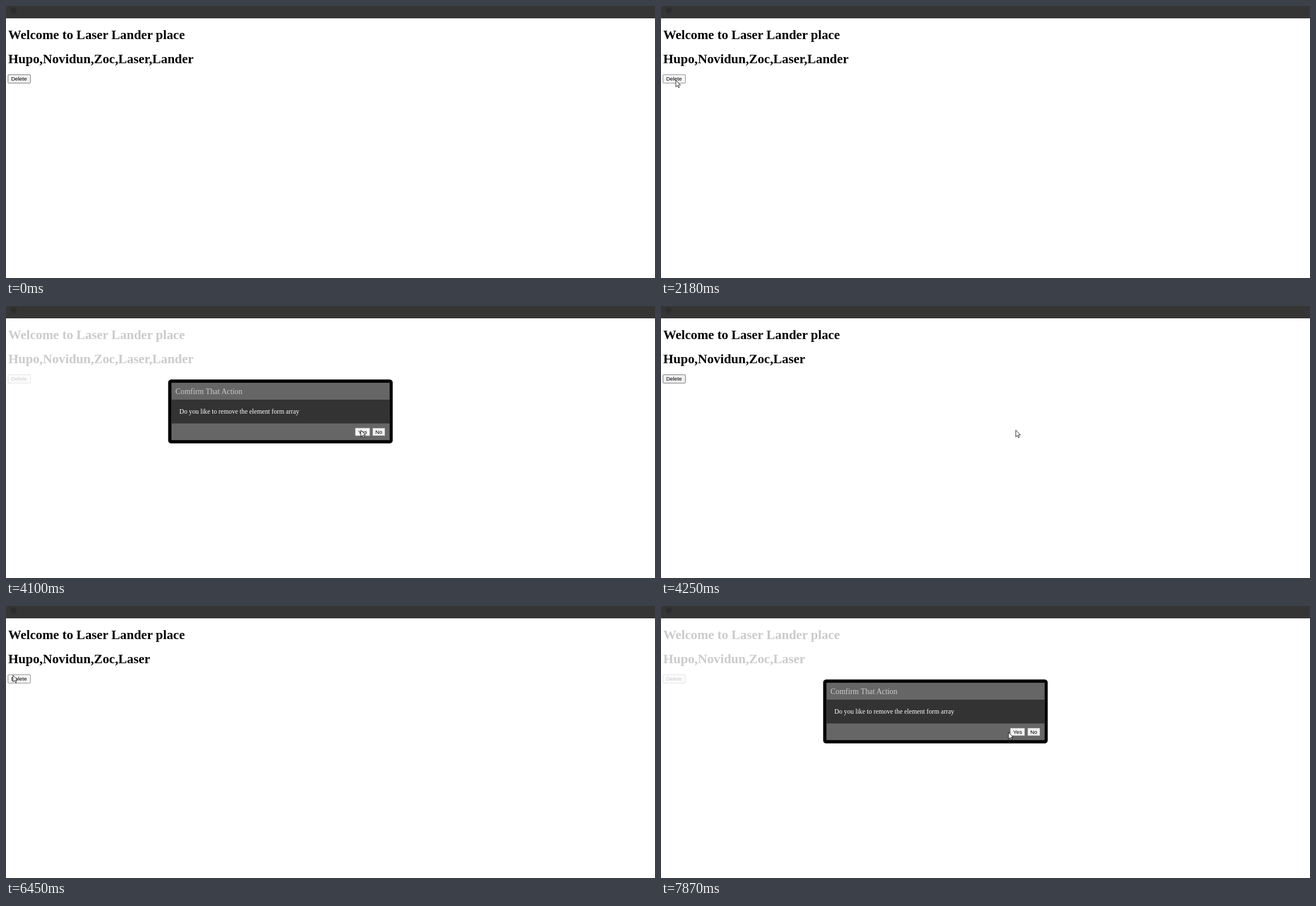
An HTML page that plays this animation: 1155 px wide and 485 px high, repeating every 8000 ms.

```html
<!DOCTYPE html>
<html lang="en">
<head>
<meta charset="utf-8">
<title>Confirm dialog</title>
<style>
  html, body { margin: 0; width: 100%; height: 100%; overflow: hidden; background: #fff; }
  svg { display: block; width: 1155px; height: 485px; }
  text { font-family: "Liberation Serif", "Times New Roman", serif; font-kerning: normal; }
  .heading { font-size: 23.25px; font-weight: bold; }
  .title { font-size: 13.78px; fill: #ccc; }
  .message { font-size: 11.62px; fill: #fff; }
  .button rect { fill: #efefef; stroke: #767676; }
  .button text { font: 9.67px "Liberation Sans", Arial, sans-serif; text-anchor: middle; }
  .hover rect { fill: #e5e5e5; stroke: #4f4f4f; }
  .active rect { fill: #f5f5f5; stroke: #8d8d8d; }
  .dim { opacity: .2; }
</style>
</head>
<body>
<svg viewBox="0 0 1155 485">
  <rect width="1155" height="22" fill="#353535"/>
  <circle cx="13.5" cy="8" r="5.5" fill="#2d2d2d"/>

  <g id="page">
    <text class="heading" x="4" y="59">Welcome to Laser Lander place</text>
    <text class="heading" x="4" y="102" id="list"></text>
    <g class="button" id="delete">
      <rect x="3.5" y="122.5" width="40" height="15" rx="1.5"/>
      <text x="23.1" y="133.2">Delete</text>
    </g>
  </g>

  <g id="dialog">
    <rect x="288.6" y="131" width="399.6" height="114" rx="5.5"/>
    <rect x="294.4" y="136.8" width="388.4" height="102.4" fill="#666"/>
    <rect x="294.4" y="167" width="388.4" height="42.4" fill="#333"/>
    <text class="title" x="301.6" y="156.5">Comfirm That Action</text>
    <text class="message" x="308.5" y="192">Do you like to remove the element form array</text>
    <g class="button" id="yes">
      <rect x="621.4" y="217.4" width="26.2" height="14" rx="1"/>
      <text x="634.6" y="227.8">Yes</text>
    </g>
    <g class="button">
      <rect x="652.2" y="217.4" width="22.4" height="14" rx="1"/>
      <text x="663.4" y="227.8">No</text>
    </g>
  </g>

  <path id="cursor" d="M.5 .5V16.4L4.2 13L6.6 18.4L9 17.4L6.7 12H11.7Z"
        fill="#fff" stroke="#000" stroke-width="1.1"/>
</svg>
<script>
const LOOP = 8000;
const STEP = 80; // the pointer moves in visible steps of about this many ms
const $ = id => document.getElementById(id);
const names = ["Hupo", "Novidun", "Zoc", "Laser", "Lander"];

// Pointer glides; each starts where the last one ended unless "from" is given,
// and "bend" is the control point of a curved path.
const glides = [
  { start: 70, end: 220, from: [905, 575], to: [90, 140] },
  { start: 400, end: 770, bend: [58, 153], to: [26, 133] },
  { start: 940, end: 940, to: [26, 138] },
  { start: 1710, end: 1780, to: [26, 132] },
  { start: 3100, end: 3270, bend: [200, 40], to: [562, 202] },
  { start: 3420, end: 3880, bend: [605, 246], to: [631, 221] },
  { start: 4480, end: 4650, to: [1004, 389] },
  { start: 4870, end: 4950, to: [1168, 505] },
  { start: 5270, end: 5340, from: [626, 523], to: [570, 363] },
  { start: 5590, end: 6130, bend: [150, 10], to: [12, 123] },
  { start: 6820, end: 7160, to: [513, 237] },
  { start: 7310, end: 7870, to: [618, 225] }
];
glides.forEach((g, i) => {
  g.from ??= glides[i - 1].to;
  g.bend ??= g.to.map((v, axis) => (v + g.from[axis]) / 2);
  g.steps = Math.round((g.end - g.start) / STEP) + 1;
});

const opened = [[2330, 4250], [6600, LOOP]];
const pressed = [[2180, 2330], [4100, 4250], [6450, 6600]];
const within = (spans, t) => spans.some(([a, b]) => t >= a && t < b);
const easeOut = p => 1 - (1 - p) ** 2;

function pointerAt(t) {
  const g = glides.findLast(glide => glide.start <= t);
  if (!g) return null;
  const interval = (g.end - g.start) / (g.steps - 1) || STEP;
  const step = Math.min(g.steps, Math.floor((t - g.start) / interval + .01) + 1);
  const e = easeOut(step / g.steps);
  return g.to.map((v, axis) => Math.round(
    (1 - e) ** 2 * g.from[axis] + 2 * e * (1 - e) * g.bend[axis] + e * e * v));
}

function setButton(id, point, enabled, down) {
  const box = $(id).querySelector("rect").getBBox();
  const over = enabled && point &&
    point[0] >= box.x && point[0] <= box.x + box.width &&
    point[1] >= box.y && point[1] <= box.y + box.height;
  $(id).setAttribute("class", "button" + (over ? (down ? " active" : " hover") : ""));
}

function render(t) {
  const point = pointerAt(t);
  const open = within(opened, t);
  const down = within(pressed, t);

  $("list").textContent = names.slice(0, t < 4250 ? 5 : 4).join(",");
  $("page").setAttribute("class", open ? "dim" : "");
  $("dialog").style.display = open ? "" : "none";
  $("cursor").style.display = point ? "" : "none";
  if (point) $("cursor").setAttribute("transform", `translate(${point}) scale(.75)`);
  setButton("delete", point, !open, down);
  if (open) setButton("yes", point, true, down);
}

const start = performance.now();
function tick() {
  render((performance.now() - start) % LOOP);
  requestAnimationFrame(tick);
}
tick();
</script>
</body>
</html>
```
